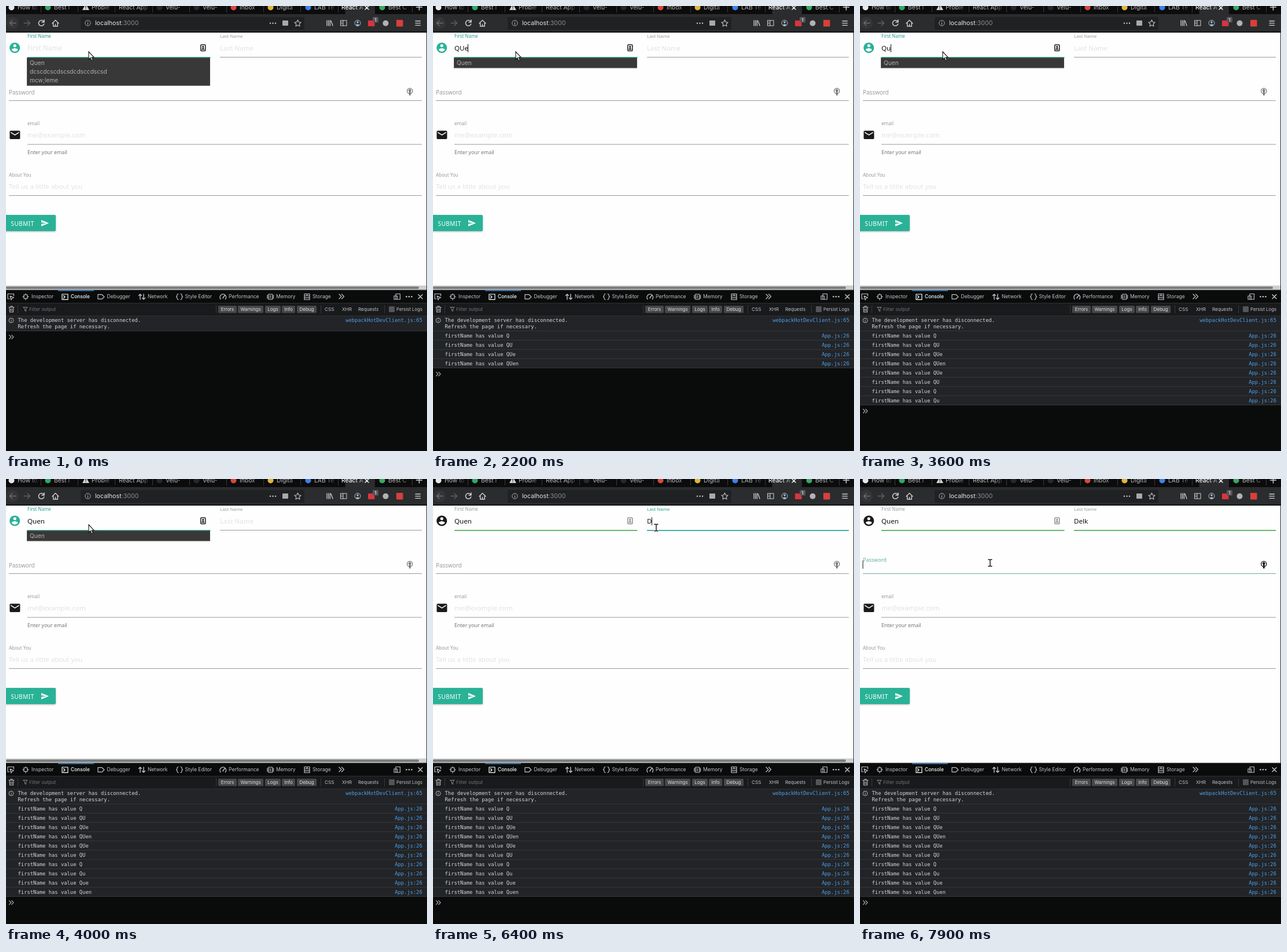
Animation of 728x769 px, one loop 8000 ms. Source, as an HTML page:

```html
<!DOCTYPE html>
<html lang="en">
<head>
<meta charset="utf-8">
<title>Form demo</title>
<style>
  html, body { margin: 0; width: 100%; height: 100%; overflow: hidden; background: #0a0c0c; }
  svg { display: block; }
  text { white-space: pre; }
  .ui { font-family: Inter, "Noto Sans", sans-serif; fill: #c3c3c5; }
  .form { font-family: "Noto Sans", "Open Sans", sans-serif; fill: #9a9a9a; }
  .log { font: 8.83px "DejaVu Sans Mono", monospace; fill: #d6d6d8; }
  .link { fill: #4f9fe8; text-anchor: end; }
</style>
</head>
<body>
<svg id="stage" width="728" height="769" viewBox="0 0 728 769"></svg>
<script>
const stage = document.getElementById('stage');
const TEAL = '#2ab297', LABEL = '#26a091', GREEN = '#4caf50', GREY = '#9a9a9a';

function el(tag, attrs, parent = stage) {
  const node = document.createElementNS('http://www.w3.org/2000/svg', tag);
  for (const k in attrs) node.setAttribute(k, attrs[k]);
  parent.appendChild(node);
  return node;
}
const set = (node, attrs) => { for (const k in attrs) node.setAttribute(k, attrs[k]); };
const show = (node, on) => node.setAttribute('visibility', on ? 'visible' : 'hidden');
const group = (attrs = {}) => el('g', attrs);
const rect = (x, y, width, height, fill, parent, rx = 0) =>
  el('rect', { x, y, width, height, fill, rx }, parent);
const dot = (cx, cy, r, fill, parent) => el('circle', { cx, cy, r, fill }, parent);
const fillPath = (d, fill, parent, more) => el('path', { d, fill, ...more }, parent);
const stroke = (d, color = '#c3c3c5', w = 1.2, parent) =>
  el('path', { d, fill: 'none', stroke: color, 'stroke-width': w, 'stroke-linecap': 'round', 'stroke-linejoin': 'round' }, parent);
function text(x, y, str, cls, size, fill, parent) {
  const node = el('text', { x, y, class: cls }, parent);
  if (size) node.style.fontSize = size + 'px';
  if (fill) node.style.fill = fill;
  node.textContent = str;
  return node;
}
function mix(a, b, p) {
  const ch = (c, i) => parseInt(c.substr(1 + 2 * i, 2), 16);
  return 'rgb(' + [0, 1, 2].map(i => Math.round(ch(a, i) + (ch(b, i) - ch(a, i)) * p)) + ')';
}

// Tab strip
function drawTabs() {
  rect(0, 0, 728, 14, '#0c0c0d');
  rect(574, 0, 64, 14, '#2b2c2e');
  const defs = el('defs', {});
  for (const [id, color] of [['fade', '#0c0c0d'], ['fadeOn', '#2b2c2e']]) {
    const g = el('linearGradient', { id }, defs);
    el('stop', { offset: 0, 'stop-color': color, 'stop-opacity': 0 }, g);
    el('stop', { offset: 1, 'stop-color': color }, g);
  }
  const tabs = [
    [20, 'How to', '#e8e8e8'], [83, 'Best I', '#2fa866'], [148, 'Proble', ''], [195, 'React App', ''],
    [276, 'Velu-', '#26282b'], [340, 'Velu-', '#26282b'], [404, 'Inbox', '#d9483b'], [468, 'Digita', '#e0b53a'],
    [533, 'LAB Te', '#3f80e8'], [580, 'React A', ''], [661, 'Best C', '#3aa860']
  ];
  tabs.forEach(([x, name, icon], i) => {
    const end = 60 + i * 64.2, active = i === 9;
    const t = text(x, 6.3, name, 'ui', 10.3, active ? '#f4f4f5' : '#b9b9bb');
    if (active) t.style.fontWeight = 500;
    if (icon) dot(x - 10.5, 2.5, 5, icon);
    rect(end - (active ? 34 : 21), 0, 20, 14, active ? 'url(#fadeOn)' : 'url(#fade)');
    rect(end - (active ? 14 : 1), 0, active ? 12 : 14, 14, active ? '#2b2c2e' : '#0c0c0d');
    if (!active) rect(Math.round(end), 0, 1, 11, '#3a3a3c');
  });
  fillPath('M138 -4L144 7H132Z', '#d4d4d4');
  rect(137.4, 0, 1.2, 3, '#111');
  rect(137.4, 4.3, 1.2, 1.2, '#111');
  stroke('M621 0L627 6M627 0L621 6', '#eee', 1.5);
  stroke('M709.5 2H719.5M714.5 -3V7', '#d0d0d2', 1.5);
}

// Navigation bar
function drawNav() {
  rect(0, 14, 728, 31, '#2b2c2e');
  rect(0, 44, 728, 2, '#131415');
  dot(11.5, 29.5, 10.5, '#343537');
  stroke('M17 29.5H6.5M11 25L6.5 29.5L11 34', '#707072', 1.3);
  stroke('M31 29.5H41.5M37 25L41.5 29.5L37 34', '#616163', 1.3);
  stroke('M65.3 27A4.8 4.8 0 1 0 65.8 31M66 24V28H62', '#d0d0d2', 1.5);
  stroke('M80 30L85.5 24.5L91 30M81.7 29V35H89.3V29M85.5 35V31.5', '#d0d0d2', 1.4);
  rect(129, 19, 387, 22, '#202123', stage, 2);
  el('circle', { cx: 141.5, cy: 29.5, r: 4.7, fill: 'none', stroke: '#b4b4b6' });
  stroke('M141.5 29V32M141.5 27V27.1', '#b4b4b6', 1.1);
  const url = text(154, 33.3, 'localhost', 'ui', 10.7, '#e8e8ea');
  const port = el('tspan', { style: 'fill:#8d8d90' }, url);
  port.textContent = ':3000';
  for (const x of [457, 461.5, 466]) dot(x, 29.7, 1.2, '#c3c3c5');
  rect(478, 25, 10, 9, '#a9a9ab', stage, 1);
  stroke('M504.5 24L506.2 27.8L510.2 28.2L507.2 31L508 35L504.5 33L501 35L501.8 31L498.8 28.2L502.8 27.8Z', '#c3c3c5', 1.1);
  stroke('M555 25V34M557.7 25V34M560.4 25V34M562 25.5L565 34', '#d0d0d2', 1.3);
  rect(578.5, 25, 10.5, 9, 'none').setAttribute('stroke', '#d0d0d2');
  stroke('M583 25V34M580 28H581.5M580 30.5H581.5', '#d0d0d2', 1);
  el('circle', { cx: 608, cy: 29.5, r: 5, fill: 'none', stroke: '#c3c3c5' });
  dot(608, 28, 1.8, '#8cc4f4');
  fillPath('M604.8 32.7Q608 29.6 611.2 32.7Q608 35.2 604.8 32.7Z', '#8cc4f4');
  rect(626, 25, 11.5, 10, '#d93440', stage, 1);
  rect(634, 19, 10, 9.5, '#56575a', stage, 1.5);
  text(637.3, 26.7, '1', 'ui', 8, '#fff');
  dot(656.5, 29.7, 5, '#b2b2b4');
  rect(675, 24, 11.5, 11.5, '#d8403a', stage, 1);
  stroke('M708 26H716.5M708 29.7H716.5M708 33.4H716.5', '#d0d0d2', 1.3);
}

function icon24(d, x, y, scale, fill) {
  return fillPath(d, fill, stage, { transform: `translate(${x} ${y}) scale(${scale})` });
}

// Page, with the parts that change kept in `ui`
const ui = {};
function drawPage() {
  rect(0, 46, 727, 445, '#fefefe');
  ui.person = icon24('M12 2C6.48 2 2 6.48 2 12s4.48 10 10 10 10-4.48 10-10S17.52 2 12 2zm0 3c1.66 0 3 1.34 3 3s-1.34 3-3 3-3-1.34-3-3 1.34-3 3-3zm0 14.2c-2.5 0-4.71-1.28-6-3.22.03-1.99 4-3.08 6-3.08 1.99 0 5.97 1.09 6 3.08-1.29 1.94-3.5 3.22-6 3.22z', 4.4, 61.4, 0.9, TEAL);
  icon24('M20 4H4c-1.1 0-1.99.9-1.99 2L2 18c0 1.1.9 2 2 2h16c1.1 0 2-.9 2-2V6c0-1.1-.9-2-2-2zm0 4l-8 5-8-5V6l8 5 8-5v2z', 4.6, 212, 0.9, '#1a1a1a');

  ui.firstLabel = text(37, 55.4, 'First Name', 'form', 8);
  ui.lastLabel = text(370, 55.4, 'Last Name', 'form', 7.9);
  ui.passLabel = text(5, 153, 'Password', 'form', 9.9);
  text(37, 206, 'email', 'form', 8.2);
  text(37, 256.3, 'Enter your email', 'form', 8.9, '#757575');
  text(5, 295.4, 'About You', 'form', 8);

  const hint = '#e2e2e2';
  ui.firstHint = text(37, 77, 'First Name', 'form', 11.7, hint);
  ui.lastHint = text(370, 77, 'Last Name', 'form', 11.6, hint);
  text(37, 227.3, 'me@example.com', 'form', 11.6, hint);
  text(5, 315.7, 'Tell us a little about you', 'form', 11.5, hint);
  ui.first = text(37, 77, '', 'form', 11.6, '#111');
  ui.last = text(370, 77, '', 'form', 11.6, '#111');

  ui.firstLine = rect(37, 88, 316.5, 1.7, TEAL);
  ui.lastLine = rect(370, 88, 349, 1, GREY);
  ui.passLine = rect(5, 163, 714, 1, GREY);
  rect(37, 238.6, 682, 1, GREY);
  rect(5, 327, 714, 1, GREY);

  ui.card = group();
  rect(336.8, 67, 8, 10.4, 'none', ui.card, 1).setAttribute('stroke-width', 1.5);
  dot(340.8, 70.7, 1.3, 'currentColor', ui.card);
  fillPath('M338.5 75Q340.8 71.2 343.1 75Z', 'currentColor', ui.card);
  ui.key = group();
  el('circle', { cx: 698.3, cy: 146.7, r: 4.6, fill: 'none', 'stroke-width': 1.4 }, ui.key);
  dot(698.3, 145.8, 1.9, 'currentColor', ui.key);
  rect(697.5, 146, 1.7, 8, 'currentColor', ui.key);
  for (const g of [ui.card, ui.key]) g.setAttribute('stroke', 'currentColor');

  const shadow = rect(-4, 361, 90, 28, TEAL, stage, 2);
  shadow.style.filter = 'drop-shadow(0 1.5px 1.5px rgba(0,0,0,.3))';
  text(8.5, 379.8, 'SUBMIT', 'form', 10, '#fff').style.letterSpacing = '.5px';
  icon24('M2.01 21L23 12 2.01 3 2 10l15 2-15 2z', 59.8, 367.8, 0.62, '#fff');

  ui.scroll = group();
  rect(0, 483, 727, 8, '#cfcfd1', ui.scroll);
  rect(0, 484.7, 714, 4.3, '#7b7c7e', ui.scroll, 2);
  rect(727, 46, 1, 445, '#2a2b2d');

  ui.popFirst = popup(36, 317, ['Quen', 'dcscdcscdscsdcdsccdscsd', 'mcw;leme']);
  ui.popLast = popup(369, 350, ['Delk']);
  ui.sliver = rect(36.5, 89.3, 316.5, 2, '#2b4640');
  ui.caret = rect(0, 66, 1, 14, '#111');
}

function popup(x, w, items) {
  const g = group();
  const box = rect(x + .5, 89.7, w - 1, 17, '#383838', g);
  box.setAttribute('stroke', '#4a4a4a');
  const rows = items.map((s, i) => text(x + 5, 102 + i * 15.2, s, 'ui', 10.2, '#b0b0b0', g));
  return n => {
    show(g, n > 0);
    box.setAttribute('height', Math.max(17, 2 + 15.2 * n));
    rows.forEach((r, i) => show(r, i < n));
  };
}

// Developer tools
function drawTools() {
  rect(0, 491, 728, 278, '#0a0c0c');
  rect(0, 490.5, 728, 1, '#232426');
  rect(90, 491, 62, 1.6, '#3a7fc2');
  rect(0, 513, 728, 23, '#191a1c');
  rect(0, 513, 728, 1, '#2e3033');
  rect(0, 535, 728, 1, '#2e3033');
  const names = { 44: 'Inspector', 112: 'Console', 174.5: 'Debugger', 245: 'Network', 309.5: 'Style Editor', 385: 'Performance', 467: 'Memory', 530: 'Storage' };
  for (const x in names) {
    const t = text(x, 505.3, names[x], 'ui', x == 112 ? 8.4 : 8.6, x == 112 ? '#fff' : '');
    if (x == 112) t.style.fontWeight = 500;
  }
  stroke('M6 506H3V497.5H13.5V501M7 501L9 508L10.5 505L13.5 504Z');
  stroke('M31 499H37V505.5H31ZM34 497V499M34 505.5V508M29 502.3H31M37 502.3H39');
  stroke('M97 498H107V507.3H97ZM99.5 500.5L102 502.7L99.5 505', '#fff');
  stroke('M159 498.7H166L170 502.5L166 506.3H159Z');
  stroke('M232 507V498M229.5 500.5L232 498L234.5 500.5M238 498V507M235.5 504.5L238 507L240.5 504.5', '#c3c3c5', 1.4);
  stroke('M298 497.5Q296 497.5 296 499.5T294.5 502.5Q296 503 296 505T298 507.5M302 497.5Q304 497.5 304 499.5T305.5 502.5Q304 503 304 505T302 507.5');
  stroke('M371 506.5A5.3 5.3 0 1 1 379.5 506.5M375 504.5L378 500.5M375.2 505V505.1', '#c3c3c5', 1.4);
  stroke('M454 498H460.5V507H454ZM452 499.5V505.5M462.5 499.5V505.5M457 500V505');
  stroke('M516 497.5H525V507.5H516ZM516 501H525M516 504.3H525M519.5 499.3H521.5');
  stroke('M576 498L580 502L576 506M580.5 498L584.5 502L580.5 506');
  stroke('M674 497.5H681.5V507H674ZM671 501H676.5V507H671Z', '#c3c3c5', 1.1);
  for (const x of [692.5, 697, 701.5]) dot(x, 502.3, 1.3, '#c3c3c5');
  stroke('M713 498.7L720 505.7M720 498.7L713 505.7', '#d0d0d2', 1.3);

  stroke('M5 520.5H14M8 520V518.7H11V520M6 521L6.5 529H12.5L13 521M8.3 523V527M10.7 523V527', '#b8b8ba', 1.1);
  rect(20, 517, 1, 14, '#36383a');
  stroke('M30 520.5H37L34.6 523.5V527.5L32.5 526.5V523.5Z', '#8b8b8d', 1);
  text(40, 527.3, 'Filter output', 'ui', 8.1, '#737376');
  for (const x of [363, 544, 654]) rect(x, 517, 1, 14, '#36383a');
  for (const [x, w, s, size] of [[367, 32, 'Errors', 7.8], [401, 44, 'Warnings', 7.9], [448, 27, 'Logs', 8], [477, 23, 'Info', 8], [503, 34, 'Debug', 8]]) {
    rect(x, 518, w, 12.5, '#47484a', stage, 1.5);
    text(x + w / 2, 527.2, s, 'ui', size, '#e0e0e2').setAttribute('text-anchor', 'middle');
  }
  text(551, 527.3, 'CSS', 'ui', 8.2);
  text(581, 527.3, 'XHR', 'ui', 8.2);
  text(609, 527.3, 'Requests', 'ui', 8.05);
  rect(662, 519, 10, 10, '#545557', stage, 1);
  text(675, 527.3, 'Persist Logs', 'ui', 7.75);

  rect(0, 536, 728, 25.5, '#222427');
  rect(0, 561, 728, 1, '#34373a');
  el('circle', { cx: 9, cy: 543.3, r: 4, fill: 'none', stroke: '#b4b4b6' });
  stroke('M9 543V545.2M9 541.2V541.3', '#b4b4b6', 1);
  text(20.5, 546.4, 'The development server has disconnected.', 'log');
  text(20.5, 557, 'Refresh the page if necessary.', 'log');
  text(720, 546.4, 'webpackHotDevClient.js:65', 'log link');

  const values = ['Q', 'QU', 'QUe', 'QUen', 'QUe', 'QU', 'Q', 'Qu', 'Que', 'Quen'];
  ui.rows = values.map((v, i) => {
    const g = group({ transform: `translate(0 ${i * 16})` });
    rect(0, 562, 728, 15.5, '#222427', g);
    rect(0, 577, 728, 1, '#34373a', g);
    text(20.5, 573.2, 'firstName has value ' + v, 'log', 0, '', g);
    text(720, 573.2, 'App.js:26', 'log link', 0, '', g);
    return g;
  });
  ui.prompt = stroke('M5.5 568.7L8.8 572L5.5 575.3M9.7 568.7L13 572L9.7 575.3', '#b0b0b2', 1.2);
}

function drawPointers() {
  ui.arrow = fillPath('M0 0V13.2L3 10.5L5 15.5L7.3 14.5L5.2 9.7H9.2Z', '#fff', stage, { stroke: '#111', 'stroke-width': 1.1 });
  ui.beam = group();
  const d = 'M-3 -5.8H-1L0 -5L1 -5.8H3M0 -5V5M-3 5.8H-1L0 5L1 5.8H3';
  stroke(d, '#fff', 3, ui.beam);
  stroke(d, '#111', 1.4, ui.beam);
}

// Each entry holds from its start time until the next one
const firstText = [[0, ''], [1100, 'QU'], [1200, 'QUe'], [1400, 'QUen'], [2200, 'QUe'], [2300, 'QU'], [2400, 'Q'], [3600, 'Qu'], [3700, 'Que'], [3900, 'Quen']];
const lastText = [[0, ''], [6400, 'D'], [6500, 'De'], [6600, 'Del'], [6700, 'Delk']];
const logCount = [[0, 0], [1100, 2], [1200, 3], [1600, 4], [2300, 5], [2400, 6], [2700, 7], [3600, 8], [3700, 9], [4000, 10]];
const caretOn = [[0, 0], [300, 1], [2700, 0], [3600, 1], [4000, 0], [4500, 1], [5000, 0], [5500, 1]];
const firstItems = [[0, 3], [1100, 0], [1200, 1], [5500, 0]];
const lastItems = [[0, 0], [6500, 1], [7500, 0]];
const pointer = [[0, [143, 79]], [4400, [148, 71]], [4500, [168, 50]], [4600, [212, 33]], [4700, [272, 28]], [4800, [338, 36]],
  [4900, [398, 52]], [5000, [434, 70]], [5100, [413, 87]], [5200, [385, 85]], [5300, [384, 84]], [5500, [386, 84]],
  [7300, [372, 92]], [7400, [322, 115]], [7500, [265, 135]], [7600, [234, 145]], [7800, [228, 145]], [7900, [225, 145]]];

const at = (steps, t) => steps.reduce((v, s) => t >= s[0] ? s[1] : v, steps[0][1]);

function render(t) {
  const blur = Math.min(1, Math.max(0, (t - 5400) / 400));
  const inLast = t >= 5500, inPass = t >= 7800;

  ui.first.textContent = at(firstText, t);
  ui.last.textContent = at(lastText, t);
  show(ui.firstHint, t < 1100);
  show(ui.lastHint, t < 6400);

  ui.person.setAttribute('fill', mix(TEAL, '#1a1a1a', blur));
  ui.firstLabel.style.fill = mix(LABEL, GREY, blur);
  ui.firstLine.setAttribute('fill', mix(TEAL, GREEN, blur));
  ui.card.style.color = inLast ? '#8f8f8f' : '#1a1a1a';

  const lastOut = inPass ? (t < 7900 ? .5 : 1) : 0;
  ui.lastLabel.style.fill = inPass ? mix(LABEL, GREY, lastOut) : mix(GREY, LABEL, blur);
  set(ui.lastLine, {
    height: inLast ? 1.7 : 1,
    fill: inPass ? mix('#26a69a', GREEN, lastOut) : mix(GREY, '#26a69a', blur)
  });

  // The password label rises while its field takes focus
  const rise = lastOut;
  ui.passLabel.setAttribute('y', 153 - 10.3 * rise);
  ui.passLabel.style.fontSize = 9.9 - .9 * rise + 'px';
  ui.passLabel.style.fill = mix(GREY, '#5fb0a5', rise);
  ui.passLine.setAttribute('fill', mix(GREY, '#6fa8a0', rise));
  ui.key.style.color = inPass ? '#1a1a1a' : '#7a7a7a';
  show(ui.scroll, !inPass);

  const field = inLast ? ui.last : ui.first;
  show(ui.caret, at(caretOn, t));
  set(ui.caret, inPass
    ? { x: 4.5, y: 141 }
    : { x: Math.round(+field.getAttribute('x') - .6 + (field.textContent ? field.getComputedTextLength() : 0)), y: 66 });

  ui.popFirst(at(firstItems, t));
  ui.popLast(at(lastItems, t));
  show(ui.sliver, t >= 1100 && t < 1200);

  const n = at(logCount, t);
  ui.rows.forEach((row, i) => show(row, i < n));
  ui.prompt.setAttribute('transform', `translate(0 ${16 * n})`);

  const move = `translate(${at(pointer, t)})`;
  for (const p of [ui.arrow, ui.beam]) p.setAttribute('transform', move);
  show(ui.arrow, !inLast);
  show(ui.beam, inLast);
}

drawTabs();
drawNav();
drawPage();
drawTools();
drawPointers();

const begin = performance.now();
function tick() {
  const t = (performance.now() - begin) % 8000;
  render(Math.floor(t / 100) * 100);
  requestAnimationFrame(tick);
}
tick();
</script>
</body>
</html>
```
